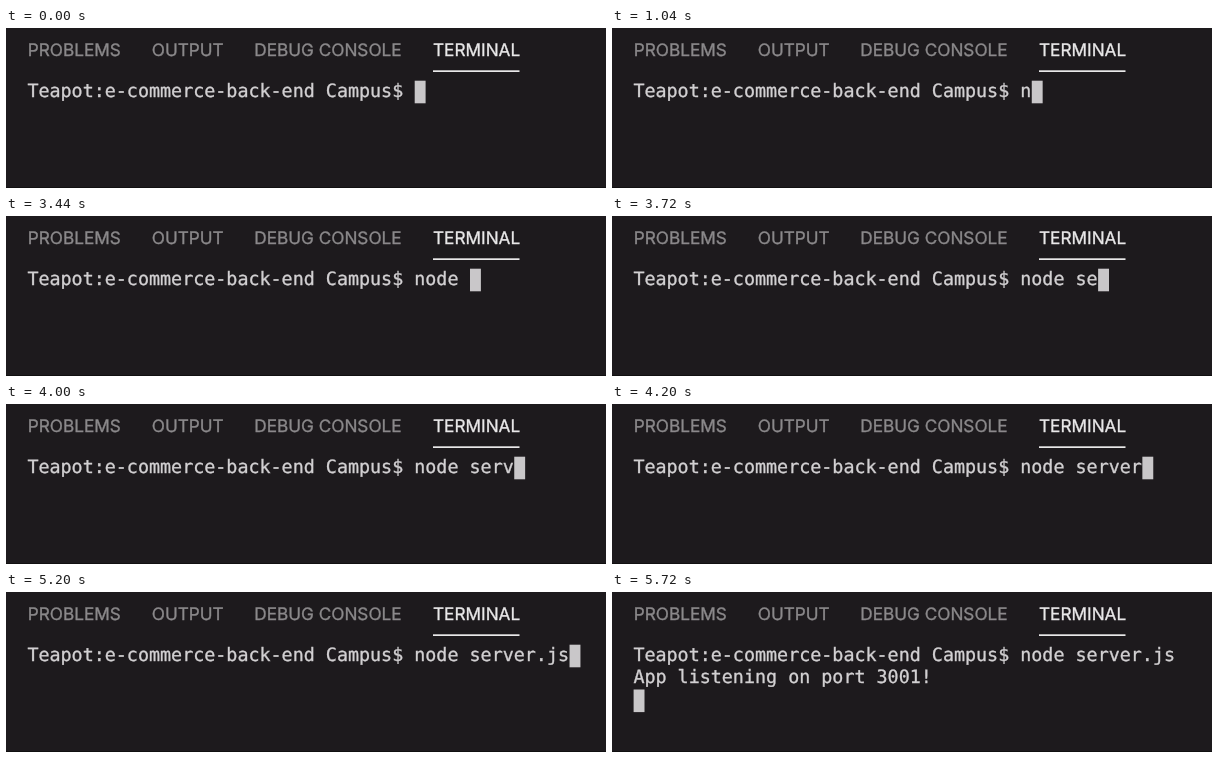
Animation, 600 px wide and 160 px high, one loop 7760 ms. Source, as an HTML page:

```html
<!DOCTYPE html>
<html lang="en">
<head>
<meta charset="utf-8">
<title>Terminal</title>
<style>
  html, body { margin: 0; width: 100%; height: 100%; overflow: hidden; background: #1d1a1d; }
  svg { display: block; }
  text { white-space: pre; text-rendering: geometricPrecision; }
  /* A thin outline gives the heavier strokes of smoothed screen text. */
  .tabs { font: 17.2px Inter, Roboto, sans-serif; fill: #8b898b; stroke: #8b898b; stroke-width: 0.35; }
  .tabs .active { fill: #e9e8e9; stroke: #e9e8e9; }
  .shell { font: 18.37px "DejaVu Sans Mono", monospace; fill: #d2d0d2; stroke: #d2d0d2; stroke-width: 0.35; }
</style>
</head>
<body>
<svg width="600" height="160" viewBox="0 0 600 160">
  <rect width="600" height="160" fill="#1d1a1d"/>
  <rect y="159" width="600" height="1" fill="#111011"/>
  <g class="tabs">
    <text x="21.8" y="28">PROBLEMS</text>
    <text x="145.8" y="28">OUTPUT</text>
    <text x="248.3" y="28">DEBUG CONSOLE</text>
    <text x="427" y="28" class="active">TERMINAL</text>
  </g>
  <rect x="427" y="42.3" width="86.5" height="1.7" fill="#e9e8e9"/>
  <g class="shell">
    <text id="command" x="21.4" y="69"></text>
    <text id="output" x="21.4" y="91.4"></text>
  </g>
  <rect id="cursor" width="10.9" height="22.6" fill="#c9c7c9"/>
</svg>
<script>
  const LOOP = 7760;
  const PROMPT = "Teapot:e-commerce-back-end Campus$ ";
  const COMMAND = "node server.js";
  const OUTPUT = "App listening on port 3001!";
  // One time per typed character of COMMAND, in ms.
  const KEY_TIMES = [1040, 1120, 1240, 1400, 3440, 3560, 3720, 3840, 4000, 4080, 4200, 4880, 5080, 5200];
  const ENTER_TIME = 5480;
  const OUTPUT_TIME = 5720;
  const LEFT = 21.6, TOP = 52.7, CHAR_WIDTH = 11.06, LINE_HEIGHT = 22.4;

  const command = document.getElementById("command");
  const output = document.getElementById("output");
  const cursor = document.getElementById("cursor");

  function setText(node, value) {
    if (node.textContent !== value) node.textContent = value;
  }

  function draw(t) {
    const typed = KEY_TIMES.filter(time => time <= t).length;
    const row = t >= OUTPUT_TIME ? 2 : t >= ENTER_TIME ? 1 : 0;
    const column = row ? 0 : PROMPT.length + typed;
    setText(command, PROMPT + COMMAND.slice(0, typed));
    setText(output, row === 2 ? OUTPUT : "");
    cursor.setAttribute("x", LEFT + column * CHAR_WIDTH);
    cursor.setAttribute("y", TOP + row * LINE_HEIGHT);
  }

  const start = performance.now();
  function tick() {
    draw((performance.now() - start) % LOOP);
    requestAnimationFrame(tick);
  }
  draw(0);
  requestAnimationFrame(tick);
</script>
</body>
</html>
```
